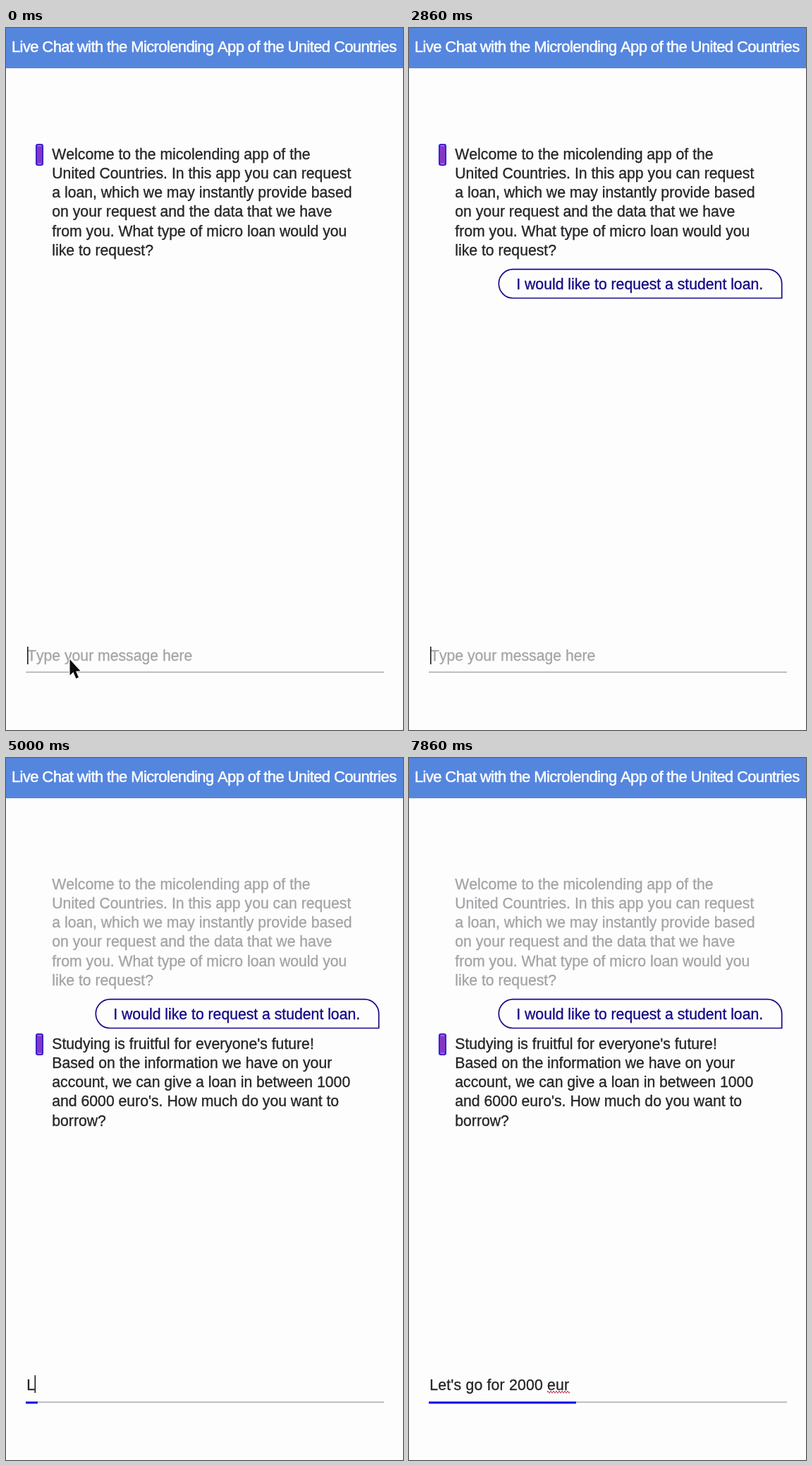
An HTML page with a canvas that plays this animation: 563x994 px, repeating every 8 s.

```html
<!DOCTYPE html>
<html lang="en">
<head>
<meta charset="utf-8">
<title>Live chat</title>
<style>
  html, body { margin: 0; width: 100%; height: 100%; overflow: hidden; background: #fefdfe; }
  canvas { display: block; width: 563px; height: 994px; }
</style>
</head>
<body>
<canvas id="stage"></canvas>
<script>
const W = 563, H = 994, LOOP = 8000, TICK = 1000 / 7;
const FAMILY = '"Liberation Sans", Arial, sans-serif';
const SIZE = 21.2, LINE = 27.2, FIELD_X = 29.3;
const INK = '#262629', NAVY = '#150a86', BLUE = '#1606ea';
const SENT = 2860, REPLY = 3000;
const BLINKS = [2430, 3430, 4430, 6290, 7860], BLINK_LENGTH = 280;

const canvas = document.getElementById('stage');
const ctx = canvas.getContext('2d');
const ratio = window.devicePixelRatio || 1;
canvas.width = W * ratio;
canvas.height = H * ratio;

const welcome = [
  'Welcome to the micolending app of the',
  'United Countries. In this app you can request',
  'a loan, which we may instantly provide based',
  'on your request and the data that we have',
  'from you. What type of micro loan would you',
  'like to request?'
];
const offer = [
  "Studying is fruitful for everyone's future!",
  'Based on the information we have on your',
  'account, we can give a loan in between 1000',
  "and 6000 euro's. How much do you want to",
  'borrow?'
];

// pace: a few points of [time, characters typed]; typing is linear between them
const messages = [
  {
    text: 'I would like to request a student loan.', spacing: 0, end: SENT,
    pace: [[140, 1], [1140, 16], [1710, 28], [2280, 38], [2700, 39]]
  },
  {
    text: "Let's go for 2000 eur ", spacing: 0.2, end: LOOP,
    pace: [[5000, 1], [5570, 3], [6130, 13], [6560, 14], [7560, 22]]
  }
];

const ramp = (t, from, to) => Math.max(0, Math.min(1, (t - from) / (to - from)));
const snap = t => Math.floor((t + 4) / TICK) * TICK;

function typedCount(pace, t) {
  const next = pace.findIndex(p => p[0] > t);
  if (next < 0) return pace[pace.length - 1][1];
  const [t0, n0] = pace[next - 1], [t1, n1] = pace[next];
  return Math.floor(n0 + (n1 - n0) * ramp(t, t0, t1));
}

function setFont(size, spacing) {
  ctx.font = `${size}px ${FAMILY}`;
  ctx.fontKerning = 'none';
  ctx.letterSpacing = `${spacing}px`;
}

function write(text, x, y, color, size = SIZE, spacing = 0, weight = 0.35) {
  setFont(size, spacing);
  ctx.fillStyle = ctx.strokeStyle = color;
  ctx.lineWidth = weight;
  ctx.lineJoin = 'round';
  ctx.fillText(text, x, y);
  ctx.strokeText(text, x, y);
}

function widthOf(text, spacing) {
  setFont(SIZE, spacing);
  return ctx.measureText(text).width;
}

function rect(x, y, w, h, color) {
  ctx.fillStyle = color;
  ctx.fillRect(x, y, w, h);
}

function paragraph(lines, y, color) {
  lines.forEach((line, i) => write(line, 65.3, y + i * LINE, color));
}

function marker(y) {
  ctx.beginPath();
  ctx.roundRect(42.8, y + 0.8, 9.4, 29.4, 2.5);
  ctx.fillStyle = '#8436c4';
  ctx.fill();
  ctx.lineWidth = 1.6;
  ctx.strokeStyle = '#2a1cd2';
  ctx.stroke();
  for (const dy of [2.4, 27.6]) rect(45, y + dy, 5, 0.9, '#b9a0ee');
}

function bubble() {
  ctx.beginPath();
  ctx.roundRect(127.3, 341.7, 401.4, 40.8, [20.4, 20.4, 0, 20.4]);
  ctx.lineWidth = 1.7;
  ctx.strokeStyle = NAVY;
  ctx.stroke();
  write(messages[0].text, 152.3, 370, NAVY);
}

function squiggle(from, to) {
  ctx.fillStyle = '#c4485c';
  for (let x = from + 1, i = 0; x < to; x += 2, i++) {
    ctx.beginPath();
    ctx.arc(x, i % 2 ? 898.6 : 897.2, 1.1, 0, 2 * Math.PI);
    ctx.fill();
  }
}

function pointer(x, y) {
  const shape = [[0, 0], [0, 22.5], [5, 18], [8.8, 27], [12.4, 25.4], [8.7, 16.8], [15, 16.4]];
  ctx.beginPath();
  shape.forEach(([dx, dy]) => ctx.lineTo(x + dx, y + dy));
  ctx.closePath();
  ctx.lineJoin = 'round';
  ctx.lineWidth = 2.6;
  ctx.strokeStyle = '#fff';
  ctx.stroke();
  ctx.fillStyle = '#0c0c0e';
  ctx.fill();
}

function caret(t, x, y) {
  const hidden = BLINKS.some(start => t >= start && t < start + BLINK_LENGTH);
  if (!hidden) rect(x, y, 1.6, 25, '#1c1c1e');
}

function inputField(t) {
  rect(28, 911.3, 508, 1.6, '#b0b0b3');
  const now = snap(t);
  const msg = messages.find(m => now >= m.pace[0][0] && t < m.end);
  if (!msg) {
    write('Type your message here', 30, 896.3, '#a5a5a8');
    caret(t, 30, 876);
    return;
  }
  const typed = msg.text.slice(0, typedCount(msg.pace, now));
  const edge = text => FIELD_X + widthOf(text, msg.spacing);
  const end = edge(typed);
  write(typed, FIELD_X, 895, INK, SIZE, msg.spacing);
  rect(28, 911.3, end + 3.6 - 28, 3, BLUE);
  if (typed.endsWith('eur ')) squiggle(edge(typed.slice(0, -4)), edge(typed.trimEnd()));
  caret(t, end - 0.8, 874);
}

function touch(t) {
  ctx.globalAlpha = ramp(t, 4060, 4280) * (1 - ramp(t, 4340, 4710));
  ctx.beginPath();
  ctx.arc(17.3, 908.3, 16.3, 0, 2 * Math.PI);
  ctx.fillStyle = '#8f8f91';
  ctx.fill();
  ctx.globalAlpha = 1;
}

function draw(t) {
  ctx.setTransform(ratio, 0, 0, ratio, 0, 0);
  rect(0, 0, W, H, '#fefdfe');
  rect(0, 0, W, 57, '#5586de');
  write('Live Chat with the Microlending App of the United Countries',
    8, 33.6, '#fff', 22, -0.62, 0.5);

  const replied = t >= REPLY;
  const shade = 38 + 126 * ramp(t, REPLY, 3430);
  paragraph(welcome, 185.7, `rgb(${shade}, ${shade}, ${shade + 3})`);
  marker(replied ? 390 : 164);
  if (t >= SENT) bubble();
  if (replied) {
    ctx.globalAlpha = ramp(t, REPLY - 80, 3300);
    paragraph(offer, 411.7, INK);
    ctx.globalAlpha = 1;
  }
  inputField(t);
  if (t < 140) pointer(90.5, 894);
  touch(t);
}

function frame() {
  draw(performance.now() % LOOP);
  requestAnimationFrame(frame);
}
frame();
</script>
</body>
</html>
```
